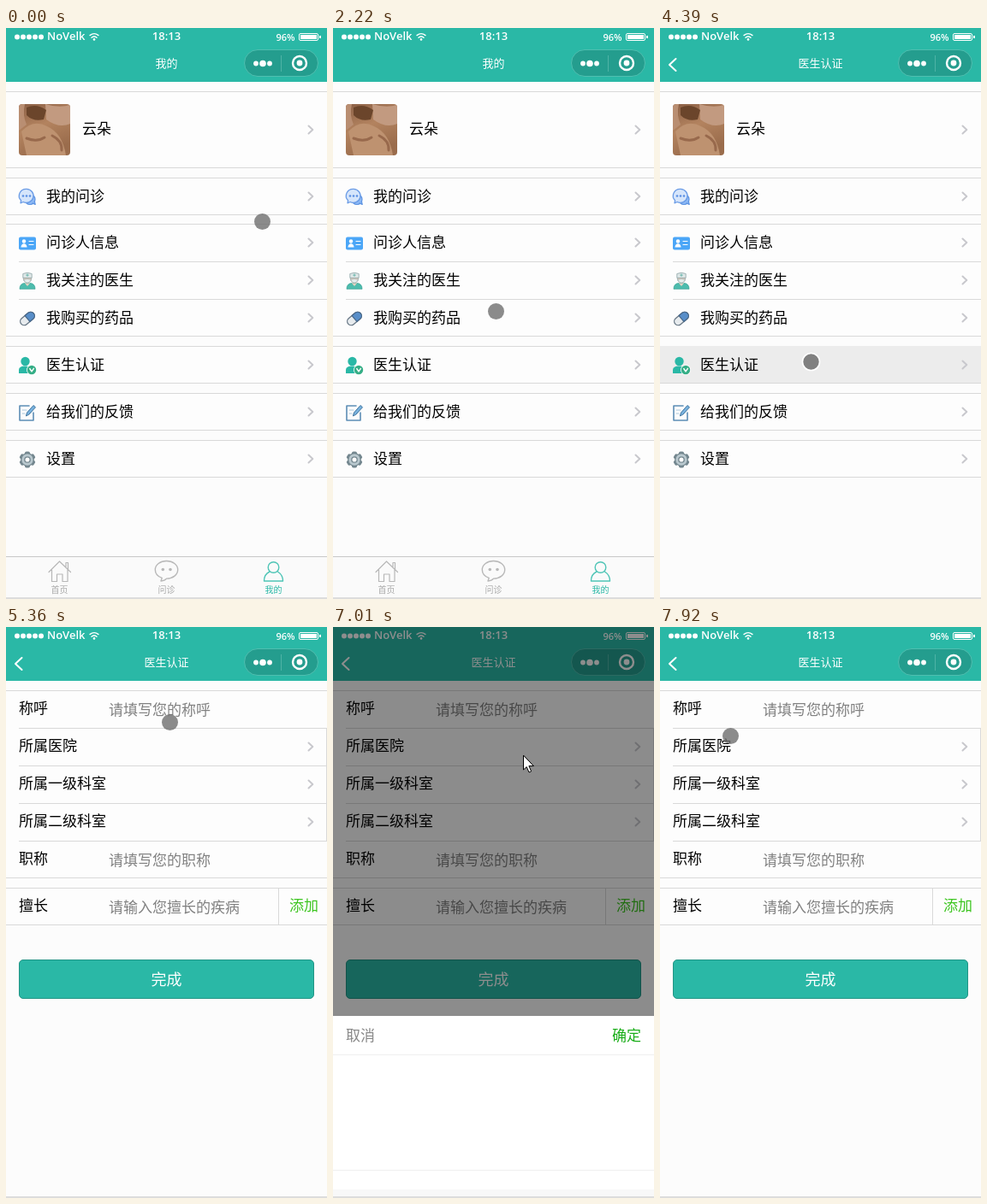
An HTML page for the animation above (8 s loop, 375 px wide and 668 px high).

```html
<!DOCTYPE html>
<html lang="zh-CN">
<head>
<meta charset="utf-8">
<title>医生认证</title>
<style>
html, body { margin: 0; width: 100%; height: 100%; overflow: hidden; background: #fcfcfc; }
svg { display: block; width: 375px; height: 668px; font-family: "Noto Sans CJK SC", "Noto Sans CJK", "Noto Sans CJK JP", sans-serif; }
.latin { font-family: "Open Sans", "Noto Sans", sans-serif; font-weight: 600; }
</style>
</head>
<body>
<svg id="stage" viewBox="0 0 375 668" xmlns="http://www.w3.org/2000/svg"></svg>
<script>
const TEAL = '#2ab8a6', LINE = '#d9d9d9', PAGE = '#fcfcfc', CELL = '#fdfdfd', GREEN = '#1aad19';
const stage = document.getElementById('stage');

// Drawing helpers
const rect = (x, y, w, h, fill, extra = '') =>
  `<rect x="${x}" y="${y}" width="${w}" height="${h}" fill="${fill}" ${extra}/>`;
const dot = (x, y, r, fill, extra = '') =>
  `<circle cx="${x}" cy="${y}" r="${r}" fill="${fill}" ${extra}/>`;
const path = (d, stroke, w = 1.5, fill = 'none') =>
  `<path d="${d}" fill="${fill}" stroke="${stroke}" stroke-width="${w}" stroke-linecap="round" stroke-linejoin="round"/>`;
const text = (s, x, cy, size = 17, fill = '#000', anchor = 'start', extra = '') =>
  `<text x="${x}" y="${cy + size * 0.37}" font-size="${size}" fill="${fill}" text-anchor="${anchor}" ${extra}>${s}</text>`;
const group = (id, body) => `<g id="${id}">${body}</g>`;
const title = s => text(s, 187.5, 41, 13, '#fff', 'middle', 'font-weight="500"');
const hline = (y, x = 0) => rect(x, y, 375 - x, 1, LINE);
const cells = (top, bottom) => rect(0, top, 375, bottom - top + 1, CELL) + hline(top) + hline(bottom);
const chevron = y => path(`M353.5 ${y - 4.5}l4.8 4.5l-4.8 4.5`, '#c8c8cd', 2);

function statusBar() {
  const dots = [13, 20, 27, 34, 41].map(x => dot(x, 10.5, 3, '#fff')).join('');
  const wifi = path('M98 8.6Q103 4.6 108 8.6M100 11.2Q103 8.6 106 11.2', '#fff', 1.4) + dot(103, 13.4, 1.3, '#fff');
  const battery = rect(342.5, 6.5, 22, 8, 'none', 'rx="1.5" stroke="#fff"') +
    rect(344, 8, 19, 5, '#fff') + rect(366, 9, 2, 3, '#fff');
  return rect(0, 0, 375, 63, TEAL) + dots + wifi + battery +
    '<g class="latin" fill="#fff"><text x="48" y="14" font-size="13">NoVelk</text>' +
    '<text x="187.5" y="13.6" font-size="13" text-anchor="middle">18:13</text>' +
    '<text x="337.5" y="14.6" font-size="11" text-anchor="end">96%</text></g>';
}

function capsule() {
  return rect(278.5, 25.5, 86, 31, '#249d8e', 'rx="15.5" stroke="#4fbfb0"') +
    dot(292, 41.5, 2.9, '#fff') + dot(300, 41.5, 3.8, '#fff') + dot(308, 41.5, 2.9, '#fff') +
    rect(321, 32, 1, 19, '#4fb3a6') +
    dot(343, 41, 8, 'none', 'stroke="#fff" stroke-width="2.4"') + dot(343, 41, 3.4, '#fff');
}

function avatar() {
  return '<clipPath id="round"><rect x="15" y="89" width="60" height="60" rx="4"/></clipPath>' +
    '<linearGradient id="fur" x1="0" y1="0" x2=".4" y2="1"><stop offset="0" stop-color="#8a5f45"/>' +
    '<stop offset=".5" stop-color="#b3835f"/><stop offset="1" stop-color="#9a6c4c"/></linearGradient>' +
    '<g clip-path="url(#round)">' + rect(15, 89, 60, 60, 'url(#fur)') +
    path('M46 89Q62 94 75 90V112Q62 118 47 107Z', 'none', 0, '#c29a80') +
    path('M15 89H22Q19 102 24 113L15 120Z', 'none', 0, '#b98e72') +
    path('M24 93Q36 88 47 96L44 107Q32 110 24 102Z', 'none', 0, '#6b452b') +
    path('M18 121Q32 106 48 115Q66 123 70 149H24Z', 'none', 0, '#be9270') +
    path('M24 129Q36 134 45 128M54 126Q66 132 65 143', '#98694c', 3) + '</g>';
}

function gear() {
  const teeth = [0, 60, 120].map(a => rect(22, 495.5, 6, 19, '#74878f', `rx="1.8" transform="rotate(${a} 25 505)"`));
  return teeth.join('') + dot(25, 505, 7.3, '#b9c8ce', 'stroke="#74878f" stroke-width="1.3"') +
    dot(25, 505, 3.2, CELL, 'stroke="#74878f" stroke-width="1.3"');
}

const icons = {
  chat: dot(28, 200.5, 6, '#8db9f5', 'stroke="#5c93e2" stroke-width="1.2"') + path('M31 205l3.2 1.4l-.8-3.4', '#5c93e2', 1.2, '#8db9f5') +
    path('M24 188.3a8.4 8 0 1 1-4 15.2l-3 1.3l.6-3a8.4 8 0 0 1 6.4-13.5Z', '#6b9ce6', 1.3, '#d5e5fb') +
    [20, 24, 28].map(x => dot(x, 196.5, 1.3, '#5b90e3')).join(''),
  card: rect(15, 244.5, 20, 15, '#4ba6f7', 'rx="2"') + dot(21, 249.5, 2.2, '#fff') +
    path('M17.5 256.5Q18 252.3 21 252.3T24.5 256.5Z', 'none', 0, '#fff') +
    path('M27 249.5h5M27 253.5h5', '#fff', 1.2),
  doctor: path('M16 305Q16 299 22 298.5H28Q34 299 34 305Z', '#3ba597', .8, '#4dbcad') +
    path('M22.5 298.5l2.5 3l2.5-3', '#e8d3c3', 1, '#e8d3c3') + dot(25, 293.5, 4.6, '#dcc9bb', 'stroke="#9aa9ab" stroke-width=".8"') +
    path('M19.8 292V287.5Q25 285 30.2 287.5V292Z', '#8fa5a8', .8, '#dfe8e8') +
    path('M21 294.5Q25 293 29 294.5Q28 298 25 298T21 294.5Z', '#a9b9ba', .6, '#e8efef') +
    path('M25 287.8v2.6M23.7 289.1h2.6', '#6ab5ac', 1),
  pill: '<g transform="rotate(-40 25 340)">' + rect(15.5, 335.5, 19, 9, '#e7ebee', 'rx="4.5" stroke="#667684" stroke-width="1.3"') +
    path('M25 335.5H30a4.5 4.5 0 0 1 0 9H25Z', '#48688a', 1.3, '#588ec9') + '</g>',
  verified: dot(22.5, 390, 5.2, TEAL) + path('M15 404V400Q15 395.5 22 395.5T30 400V404Z', 'none', 0, TEAL) +
    dot(30, 400, 6, '#fdfdfd') + dot(30, 400, 5.2, '#35ae86') + path('M27.8 398.5l2.2 3.4l2.4-3.6', '#fff', 1.4),
  note: path('M27 442H16V459H32V450', '#5c8db5', 1.6) + path('M19 447h5M19 451h3', '#a9c6dc', 1) +
    path('M23.5 453.5l1-3.5L32 441.5l2.5 2.2L27 452Z', '#3f759f', 1, '#79b2de'),
  gear: gear()
};

function menuPage() {
  const blocks = [[74, 163], [175, 218], [229, 360], [372, 415], [427, 470], [482, 525]];
  const rows = [['我的问诊', 197], ['问诊人信息', 251], ['我关注的医生', 295], ['我购买的药品', 339],
    ['医生认证', 394], ['给我们的反馈', 449], ['设置', 504]];
  return blocks.map(b => cells(...b)).join('') + hline(273, 15) + hline(317, 15) +
    rect(0, 230, 375, 43, '#ececec', 'id="heldRow"') + rect(0, 372, 375, 43, '#ececec', 'id="tappedRow"') +
    avatar() + text('云朵', 89, 118) + chevron(119) +
    rows.map(([s, y]) => text(s, 47, y - 0.7) + chevron(y)).join('') + Object.values(icons).join('');
}

function tabBar() {
  const grey = '#b8b8b8', active = '#4fc5b6';
  return rect(0, 618, 375, 50, '#fafafa') + rect(0, 618, 375, 1, '#c8c8c8') +
    path('M50 636.5L62.5 624L75.5 636.5M53.5 634V647.5H59.5V639H66V647.5H72V634M70 630V625.5H72.5V633', grey, 1.2) +
    path('M187.5 623.5c7.5 0 13.2 4.6 13.2 10.3s-5.7 10.3-13.2 10.3q-2 2.6-6.5 2.9l1.2-3.6c-4.6-1.6-7.9-5.2-7.9-9.6c0-5.7 5.7-10.3 13.2-10.3Z', grey, 1.4) +
    dot(183.3, 633.5, 1.8, grey) + dot(192, 633.5, 1.8, grey) +
    dot(312.5, 631, 6.3, 'none', `stroke="${active}" stroke-width="1.4"`) +
    path('M308 636Q301.5 639 301.5 647H323.5Q323.5 640 317.5 636', active, 1.4) +
    text('首页', 62.5, 657.6, 10, '#a8a8a8', 'middle') + text('问诊', 187.5, 657.6, 10, '#a8a8a8', 'middle') +
    text('我的', 312.5, 657.6, 10, TEAL, 'middle');
}

function formPage() {
  const labels = [['称呼', 95], ['所属医院', 139], ['所属一级科室', 183], ['所属二级科室', 227], ['职称', 271], ['擅长', 326]];
  const hints = [['请填写您的称呼', 97], ['请填写您的职称', 273], ['请输入您擅长的疾病', 328]];
  return rect(0, 63, 375, 605, PAGE) + cells(74, 293) + cells(305, 348) +
    [118, 162, 206, 250].map(y => hline(y, 15)).join('') +
    rect(374, 118, 1, 132, LINE) + rect(318, 306, 1, 42, LINE) +
    labels.map(([s, y]) => text(s, 15, y)).join('') +
    hints.map(([s, y]) => text(s, 120, y, 17, '#808080')).join('') +
    [140, 184, 228].map(chevron).join('') + text('添加', 331, 326, 17, '#3cc51f') +
    rect(15.5, 389.5, 344, 45, TEAL, 'rx="4.5" stroke="#229485"') +
    text('完成', 187.5, 412, 18, '#fff', 'middle') + rect(120, 85, 1, 22, '#000', 'id="caret"');
}

const sheet = rect(0, 0, 375, 285, '#fff') + rect(0, 45, 375, 1, '#efefef') + rect(0, 180, 375, 1, '#efefef') +
  text('取消', 15, 23, 17, '#888') + text('确定', 326, 23, 17, GREEN);

stage.innerHTML = rect(0, 0, 375, 668, PAGE) + group('menu', menuPage()) + group('tabs', tabBar()) +
  group('form', formPage()) + statusBar() + group('menuTitle', title('我的')) +
  group('formTitle', title('医生认证') + path('M18.5 36L11 43L18.5 50', '#fff', 2)) +
  capsule() + rect(0, 0, 375, 668, '#000', 'id="mask"') + group('sheet', sheet) +
  rect(0, 658, 375, 8, '#f8f8f8', 'id="strip"') + rect(0, 666, 375, 2, '#dcdcdc') +
  group('touch', dot(0.5, 0.5, 9.5, '#6e6e6e', 'opacity=".8"') +
    dot(0.5, 0.5, 10, '#808080', 'id="ring" stroke="#fff" stroke-width="1.6"')) +
  group('arrow', path('M.5 .5V17L4.2 13.6L7 20L9.6 18.8L6.9 12.6H12Z', '#000', 1, '#fff'));

const el = id => document.getElementById(id);
const show = (id, on) => el(id).setAttribute('visibility', on ? 'visible' : 'hidden');
const move = (id, x, y) => el(id).setAttribute('transform', `translate(${x} ${y})`);

// The screen refreshes in bursts: first time, last time, count.
const LOOP = 8000;
const ticks = [[0, 0, 1], [120, 1050, 8], [1170, 2100, 8], [2220, 2220, 1], [2370, 3150, 7], [3300, 4110, 7],
  [4390, 4390, 1], [4540, 5360, 7], [5510, 5510, 1], [5790, 5790, 1], [6070, 6860, 6], [7010, 7010, 1],
  [7130, 7400, 3], [7650, 7920, 3]]
  .flatMap(([a, b, n]) => Array.from({ length: n }, (_, i) => n > 1 ? a + (b - a) * i / (n - 1) : a));

// Pointer path: time, x, y
const trail = [[0, 299, 226], [250, 270, 224], [500, 170, 268], [800, 86, 288], [1050, 105, 262],
  [1300, 130, 238], [1700, 165, 260], [2100, 188, 268], [2220, 190, 331], [2600, 200, 384], [3150, 190, 350],
  [3300, 181, 336], [3500, 215, 450], [3705, 252, 577], [4110, 180, 392], [4390, 176, 390], [4700, 179, 365],
  [5360, 191, 111], [5510, 207, 101], [6070, 207, 101], [6860, 225, 146], [7010, 222, 150],
  [7400, 187, 165], [7650, 187, 165], [7920, 82, 127], [8000, 82, 127]];

function pointer(t) {
  const i = Math.max(1, trail.findIndex(p => p[0] >= t));
  const [a, b] = [trail[i - 1], trail[i]];
  const k = (t - a[0]) / (b[0] - a[0]);
  return [a[1] + (b[1] - a[1]) * k, a[2] + (b[2] - a[2]) * k];
}

function ease(t, start, length) {
  const k = Math.min(1, Math.max(0, (t - start) / length));
  return k * k * (3 - 2 * k);
}

function draw(time) {
  const t = ticks.filter(s => s <= time + 0.01).pop();
  const between = (a, b) => t >= a && t < b;
  const onForm = t >= 4540;
  const titled = t >= 4390;
  const open = ease(t, 6830, 268) - ease(t, 7562, 268);
  const isArrow = between(7010, 7780);
  const [x, y] = pointer(t);

  show('menu', !onForm);
  show('form', onForm);
  show('tabs', !titled);
  show('menuTitle', !titled);
  show('formTitle', titled);
  show('heldRow', between(1400, 2200));
  show('tappedRow', between(4390, 4540));
  show('caret', between(5790, 6200));
  el('mask').setAttribute('opacity', 0.6 * open);
  show('sheet', open > 0);
  show('strip', open > 0.1);
  move('sheet', 0, 668 - 285 * open);
  show('touch', !isArrow);
  show('ring', between(4390, 4540));
  show('arrow', isArrow);
  move('touch', x, y);
  move('arrow', x, y);
}

const begin = performance.now();
function loop() {
  draw((performance.now() - begin) % LOOP);
  requestAnimationFrame(loop);
}
loop();
</script>
</body>
</html>
```
